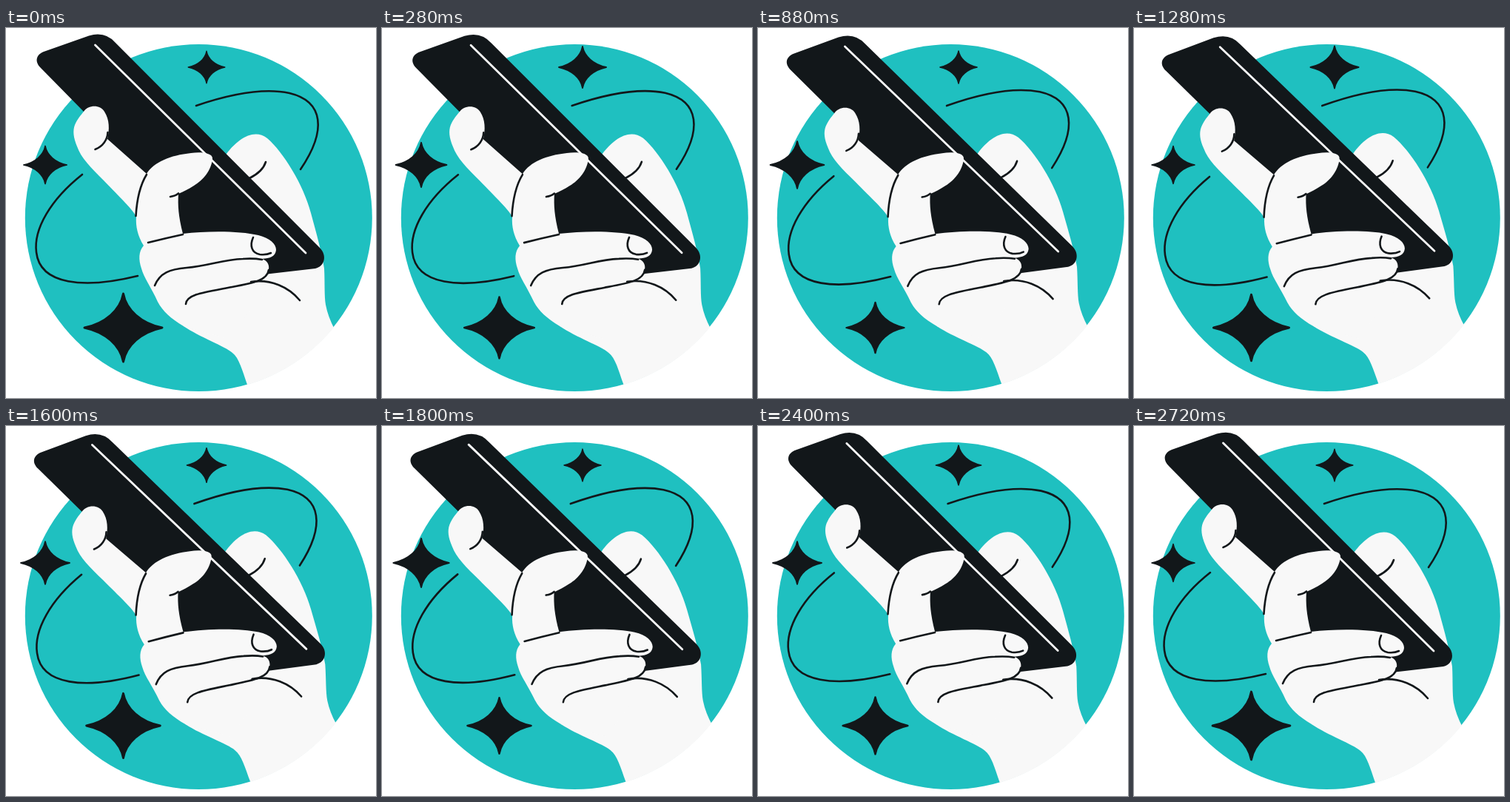
Animation of 500 by 500 pixels, one loop 2.76 s. Source, as an HTML page:

```html
<!DOCTYPE html>
<html lang="en">
<head>
<meta charset="utf-8">
<title>Hand with phone</title>
<style>
  html, body { margin: 0; width: 100%; height: 100%; overflow: hidden; background: #fff; }
  svg { display: block; width: 100vw; height: 100vh; }
  .ink { fill: #12171a; }
  .skin { fill: #f8f8f8; }
  .line { fill: none; stroke: #12171a; stroke-width: 2.6; stroke-linecap: round; stroke-linejoin: round; }
  .star { fill: #12171a; stroke: #12171a; stroke-width: 3; stroke-linejoin: round; }
</style>
</head>
<body>
<svg viewBox="0 0 500 500" xmlns="http://www.w3.org/2000/svg">
  <defs>
    <clipPath id="disc"><circle cx="260.3" cy="256.5" r="235.2"/></clipPath>
    <path id="spark" d="M0-46C4-24 24-6 52.5 0C24 6 4 24 0 46C-4 24-24 6-52.5 0C-24-6-4-24 0-46Z"/>
  </defs>
  <circle cx="260.3" cy="256.5" r="234.5" fill="#1fc0c0"/>

  <g clip-path="url(#disc)">
    <g class="sway">
      <!-- orbit arcs -->
      <path class="line" d="M257 105C304 89 350 81 383 88C429 99 434 138 398 191"/>
      <path class="line" d="M103 198C60 232 37 272 41 303C46 347 105 353 178 335"/>
      <!-- thumb base, palm and wrist -->
      <path class="skin" d="M285 190L298 170C313 150 335 135 353 149C375 168 402 212 412 250C420 280 426 300 430 325C431 345 430 362 432 374Q435 390 444 407L500 520H338L326 482C319 462 315 446 306 439C296 430 262 418 240 403Z"/>
      <path class="line" d="M351 181Q347 194 329 203"/>
    </g>
  </g>

  <g class="sway">
    <!-- phone -->
    <path class="ink" d="M47 54C38 45 41 36 51 32L112 10.500Q134 4 148 20L424 297C434 307 431 322 418 325L340 334L240 300L130 160L105 113Z"/>
    <path d="M120.500 23L405 304" fill="none" stroke="#f8f8f8" stroke-width="2.800" stroke-linecap="round"/>
    <!-- fingers -->
    <path class="skin" d="M105 113C111 104 127 103 133 113C140 124 140 137 137 150L190 197C200 181 222 172 250 169C264 167 279 169 279 176C278 192 266 206 254 213C246 218 240 221 233 224C232 240 233 254 239 278C272 274 316 274 341 280C357 284 365 292 365 300C364 309 357 311 346 312C353 314 356 320 355 326C353 335 344 341 332 343L360 345L300 420L240 403C222 392 212 383 205 370C196 350 186 337 183 325C179 313 179 302 186 294C178 281 175 268 176 255C172 246 154 229 132 206C115 189 101 175 96 160C91 148 90 139 93 131C97 122 101 118 105 113Z"/>
    <path class="line" d="M120.500 164C131 160 137 151 137.500 141"/>
    <path class="line" d="M175.500 254C177 228 182 211 190 198"/>
    <path class="line" d="M222 228Q229 227 233 223.500"/>
    <path class="line" d="M192 290Q216 284 239 279"/>
    <path class="line" d="M334 283C329 294 332 304 343 306Q352 307 358 304"/>
    <path class="line" d="M201 348C208 331 221 326 244 324C276 321 292 313 320 312Q335 311 346 313"/>
    <path class="line" d="M243 373C244 360 268 357 300 351C332 345 353 342 355 327"/>
    <path class="line" d="M331 343C358 339 382 350 397 368"/>
  </g>

  <use class="star" href="#spark" id="top"/>
  <use class="star" href="#spark" id="left"/>
  <use class="star" href="#spark" id="low"/>
</svg>
<script>
  const LOOP = 2760;
  const sway = document.querySelectorAll('.sway');

  // Half widths alternate between a and b at the listed times.
  const stars = [
    { id: 'top', x: 271, y: 53, a: 25.5, b: 33.5, keys: [0, 340, 820, 1290, 1750, 2220, 2750] },
    { id: 'left', x: 53, y: 185, a: 29.7, b: 40.8, keys: [-69, 621, 1311, 2001, 2691] },
    { id: 'low', x: 158.5, y: 405, a: 54, b: 38, keys: [0, 710, 1420, 2090, 2760] }
  ];
  stars.forEach(s => { s.el = document.getElementById(s.id); });

  const ease = u => (1 - Math.cos(Math.PI * u)) / 2;

  function level(keys, t) {
    const all = [...keys, keys[1] + LOOP];
    let i = 0;
    while (i < all.length - 2 && t >= all[i + 1]) i++;
    const e = ease((t - all[i]) / (all[i + 1] - all[i]));
    return i % 2 ? 1 - e : e;
  }

  function draw(t) {
    const turn = -1.1 * ease(2 * t / LOOP);
    sway.forEach(g => g.setAttribute('transform', `rotate(${turn} 260 250)`));
    for (const s of stars) {
      const r = s.a + (s.b - s.a) * level(s.keys, t);
      s.el.setAttribute('transform', `translate(${s.x} ${s.y}) scale(${r / 54})`);
    }
  }

  const start = performance.now();
  function tick() {
    draw((performance.now() - start) % LOOP);
    requestAnimationFrame(tick);
  }
  tick();
</script>
</body>
</html>
```
